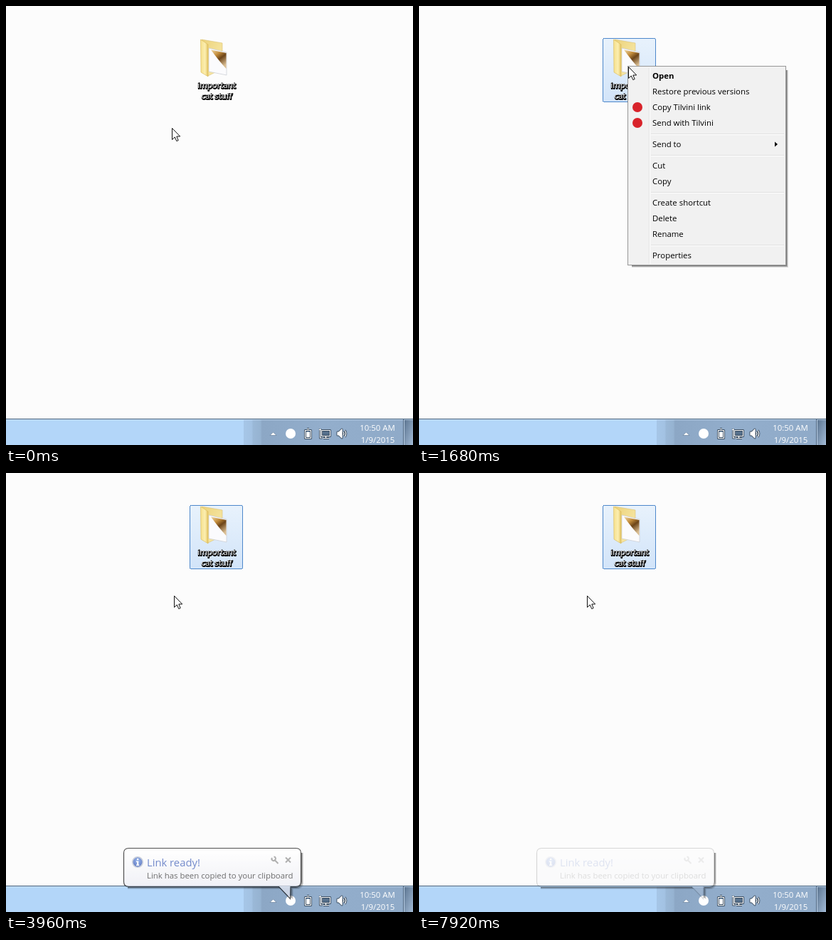
Recreate the animation shown at these times as an HTML page. Size 572 px wide and 616 px high, loop 8000 ms.

```html
<!DOCTYPE html>
<html lang="en">
<head>
<meta charset="utf-8">
<title>Copy link from the desktop</title>
<style>
  html, body { margin: 0; width: 100%; height: 100%; overflow: hidden; background: #fcfcfc; }
  svg { display: block; width: 100%; height: 100%; }
  text { font: 11.4px "Open Sans", "Noto Sans", sans-serif; }
  .bold { font-weight: 700; }
  .label { text-anchor: middle; fill: #fff; font-weight: 500; }
  .label.shade { fill: #000; stroke: #000; stroke-width: 1.9; stroke-linejoin: round; }
  .clock { text-anchor: middle; fill: #fff; font-weight: 500; }
  .title { font-size: 14.8px; fill: #3557b5; }
  .crisp { shape-rendering: crispEdges; }
  .line { fill: none; stroke-linejoin: round; }
</style>
</head>
<body>
<svg viewBox="0 0 572 616">
  <defs>
    <linearGradient id="tray">
      <stop offset="0" stop-color="#a6c6e7"/><stop offset=".05" stop-color="#a3c2e3"/>
      <stop offset=".06" stop-color="#9ab8d7"/><stop offset=".105" stop-color="#96b3d1"/>
      <stop offset=".115" stop-color="#8ca7c5"/><stop offset=".5" stop-color="#93aecc"/>
      <stop offset="1" stop-color="#8faac8"/>
    </linearGradient>
    <linearGradient id="corner" x2="1" y2="1">
      <stop offset="0" stop-color="#58718d"/><stop offset="1" stop-color="#a3bbd6"/>
    </linearGradient>
    <linearGradient id="flap">
      <stop offset="0" stop-color="#f6e08c"/><stop offset=".6" stop-color="#fbeeb0"/>
      <stop offset="1" stop-color="#e3c25f"/>
    </linearGradient>
    <linearGradient id="back" x2="1" y2="1">
      <stop offset="0" stop-color="#ecd27a"/><stop offset="1" stop-color="#faeeb4"/>
    </linearGradient>
    <linearGradient id="photo" x2=".6" y2="1">
      <stop offset="0" stop-color="#f0d9a8"/><stop offset=".35" stop-color="#c48d3c"/>
      <stop offset=".6" stop-color="#6d4519"/><stop offset="1" stop-color="#d9bd92"/>
    </linearGradient>
    <linearGradient id="light" x2="0" y2="1">
      <stop offset="0" stop-color="#e8f2fc"/><stop offset="1" stop-color="#d2e4f9"/>
    </linearGradient>
    <linearGradient id="strong" x2="0" y2="1">
      <stop offset="0" stop-color="#dae8f9"/><stop offset="1" stop-color="#bcd5f5"/>
    </linearGradient>
    <linearGradient id="row" x2="0" y2="1">
      <stop offset=".4" stop-color="#f6f9fc"/><stop offset=".45" stop-color="#e8eff7"/>
      <stop offset="1" stop-color="#e6eef8"/>
    </linearGradient>
    <linearGradient id="bubble" x2="0" y2="1">
      <stop offset=".1" stop-color="#fff"/><stop offset="1" stop-color="#e4e5f0"/>
    </linearGradient>
    <radialGradient id="info" cy=".35">
      <stop offset="0" stop-color="#6f9ae8"/><stop offset="1" stop-color="#2a50b4"/>
    </radialGradient>
    <g id="trayIcons" class="line">
      <path d="M420.500 595.500H428.500V606.500H420.500ZM423 593.500H426"/>
      <path d="M443.500 595.500H455.500V603.500H443.500ZM446 606.500H454M449.500 604V606M441.500 593V606H445M440 594.500H443"/>
      <path d="M466 598H468L472 594V606L468 602H466Z"/>
      <path d="M474 597.500Q476 600 474 602.500M476 595.500Q479.500 600 476 604.500"/>
    </g>
  </defs>

  <rect width="572" height="616" fill="#fcfcfc"/>

  <g id="selection">
    <rect id="selectFill" x="258.5" y="45.5" width="74" height="89" rx="2"/>
    <rect id="focus" class="crisp" x="258.5" y="45.5" width="74" height="89" rx="2" fill="none"
      stroke="#1d5fae" stroke-dasharray="1 1"/>
  </g>

  <g>
    <path d="M275 47L304 52V88L284 98Z" fill="url(#back)" stroke="#dcc272" stroke-width=".6"/>
    <path d="M285 59L310 65V97L285 92Z" fill="#fbfbfd" stroke="#c9ccd2" stroke-width=".7"/>
    <path d="M288 61.500L309.500 66V88Q300 78 288 61.500Z" fill="url(#photo)"/>
    <path d="M273.500 47L284 54V99L274 93Z" fill="url(#flap)" stroke="#d9b958" stroke-width=".6"/>
  </g>
  <g id="labels"></g>

  <g id="taskbar">
    <rect y="579" width="572" height="37" fill="#b3d6f9"/>
    <rect x="334" y="579" width="225" height="37" fill="url(#tray)"/>
    <rect x="559" y="579" width="13" height="37" fill="url(#corner)"/>
    <path class="crisp" d="M0 580.5H572" stroke="#d3e7fb" stroke-opacity=".7"/>
    <path class="crisp" d="M0 579.5H572" stroke="#46617c"/>
    <path class="crisp" d="M558.500 580V616" stroke="#4f6680"/>
    <path class="crisp" d="M559.500 581V616" stroke="#b9cee4"/>
    <path d="M371 602.500L375.500 598L380 602.500Z" fill="#fff" stroke="#5c7590" stroke-width=".6"/>
    <circle cx="400" cy="600" r="7" fill="#fff"/>
    <use href="#trayIcons" stroke="#35485c" stroke-width="3"/>
    <path d="M445 597H454V602H445Z" fill="#56708c"/>
    <use href="#trayIcons" stroke="#fff" stroke-width="1.200"/>
    <path d="M422 598H427V605H422ZM466 598H468L472 594V606L468 602H466Z" fill="#fff"/>
    <text class="clock" x="522" y="596">10:50 AM</text>
    <text class="clock" x="522.5" y="613">1/9/2015</text>
  </g>

  <g id="menuShadow" class="line crisp" stroke="#000"></g>
  <g id="menu">
    <rect x="293.5" y="84.5" width="222" height="279" fill="#f1f1f1" stroke="#979797"/>
    <path class="crisp" d="M323.500 87V362" stroke="#e2e3e3"/>
    <path class="crisp" d="M324.500 87V362" stroke="#fff"/>
    <rect id="hover" x="296.500" width="216" height="21" rx="2" fill="url(#row)" stroke="#aecff7"/>
    <g id="items"></g>
    <path d="M500 190.500L504 194L500 197.500Z"/>
  </g>
  <g id="chosen">
    <rect x="296.500" y="131.500" width="216" height="21" rx="2" fill="url(#row)" stroke="#b4d3f5"/>
  </g>

  <g id="balloonShadow" class="line" stroke="#000"></g>
  <g id="balloon">
    <path d="M172.500 526.500H407.500Q414.500 526.500 414.500 533.500V573.500Q414.500 580.500 407.500 580.500H400L399.500 597.500L383.500 580.500H172.500Q165.500 580.500 165.500 573.500V533.500Q165.500 526.500 172.500 526.500Z"
      fill="url(#bubble)" stroke="#000" stroke-width="1.200"/>
    <circle cx="185" cy="546" r="7.200" fill="url(#info)" stroke="#b4bccd" stroke-width="1.600"/>
    <path d="M184 541H186.300V543H184ZM183 544.500H186.300V549.500H187.300V551H183V549.500H184V546H183Z" fill="#fff"/>
    <text class="title" x="198" y="552">Link ready!</text>
    <text x="198" y="569" fill="#2c2c2c">Link has been copied to your clipboard</text>
    <g class="line" stroke="#8c8c8c" stroke-width="2">
      <path d="M377 542.500L382.500 548M374 540A2.500 2.500 0 0 0 378 543A2.500 2.500 0 0 0 376.500 538.500"/>
      <path d="M393 539.500L400 546.500M400 539.500L393 546.500"/>
    </g>
  </g>

  <g id="pointer">
    <path d="M.5 .5V16.500L4.300 13L6.800 18.600L9.200 17.500L6.800 12H11.700Z" fill="#fff" stroke="#111"/>
    <g id="busy">
      <circle cx="15" cy="0" r="6.200" fill="#e3f3f8" stroke="#3b93ad" stroke-width="2.800"/>
      <circle id="spin" cx="15" cy="0" r="6.200" fill="none" stroke="#9fe0e2" stroke-width="2" stroke-dasharray="10 29"/>
    </g>
  </g>
</svg>
<script>
const LOOP = 8000;
const $ = id => document.getElementById(id);
const set = (id, attrs) => { for (const k in attrs) $(id).setAttribute(k, attrs[k]); };
const show = (id, opacity) => set(id, { opacity: +opacity });

// Menu rows: [text centre y, caption]
const rows = [
  [98, 'Open'], [120, 'Restore previous versions'], [142, 'Copy Tilvini link'],
  [164, 'Send with Tilvini'], [194, 'Send to'], [224, 'Cut'], [246, 'Copy'],
  [276, 'Create shortcut'], [298, 'Delete'], [320, 'Rename'], [350, 'Properties']
];
const rowMarkup = ([y, caption]) =>
  (caption.includes('Tilvini') ? `<circle cx="307" cy="${y}" r="7" fill="#d8232a"/>` : '') +
  `<text x="328" y="${y + 4}" class="${caption === 'Open' ? 'bold' : ''}">${caption}</text>`;
const divider = y =>
  `<path class="crisp" d="M326 ${y - .5}H513" stroke="#e0e0e0"/><path class="crisp" d="M326 ${y + .5}H513" stroke="#fff"/>`;

$('items').innerHTML = rows.map(rowMarkup).join('') + [180, 210, 262, 336].map(divider).join('');
$('chosen').innerHTML += rowMarkup(rows[2]);
$('labels').innerHTML = [['important', 115], ['cat stuff', 130]].map(([word, y]) =>
  `<text class="label shade" x="296.500" y="${y + .7}">${word}</text><text class="label" x="296" y="${y}">${word}</text>`).join('');

const shadowLayers = [.5, .3, .12];
$('menuShadow').innerHTML = shadowLayers.map((o, i) =>
  `<path d="M${516.5 + i} 90V${364.5 + i}H299" stroke-opacity="${o}"/>`).join('');
$('balloonShadow').innerHTML = shadowLayers.map((o, i) =>
  `<path d="M${415.5 + i} 533V${574 + i}Q${415.5 + i} ${581.5 + i} 408 ${581.5 + i}H${401 + i}V${596 + i}M${384 + i} ${581.5 + i}H171" stroke-opacity="${o}"/>`).join('');

const clamp = v => Math.min(1, Math.max(0, v));
const ease = p => p * p * (3 - 2 * p);
// Progress that rises in n equal jumps, the first one at `start`
const steps = (t, start, gap, n) => clamp((Math.floor((t - start) / gap) + 1) / n);

// Pointer moves: [start, gap, steps, x, y]
const moves = [
  [500, 55, 9, 293, 84], [1680, 60, 1, 294, 85],
  [1740, 60, 5, 317, 134], [2740, 60, 9, 236, 172]
];
function pointerAt(t) {
  let x = 233, y = 171;
  for (const [start, gap, n, toX, toY] of moves) {
    const p = ease(steps(t, start, gap, n));
    x += (toX - x) * p;
    y += (toY - y) * p;
  }
  return [Math.round(x), Math.round(y)];
}

const fadeTicks = [4590, 4840, 5100, 5350, 5680, 6010, 6300, 6600, 6900, 7140, 7380, 7620, 7920];
function balloonOpacity(t) {
  if (t < 4590) return 1 - (1 - clamp((t - 3300) / 1290)) ** 1.6;
  const tick = fadeTicks.filter(v => v <= t).pop();
  return 1 - .86 * (tick - 4590) / 3330;
}

function draw(t) {
  const [x, y] = pointerAt(t);
  const over = x >= 258 && x <= 332 && y >= 45 && y <= 134;
  const selected = t >= 1180;
  const strong = selected && over && (t < 1340 || t >= 2440);
  const menuOpen = t >= 1180 && t < 2440;

  show('selection', selected || over);
  show('focus', selected);
  set('selectFill', {
    fill: `url(#${strong ? 'strong' : 'light'})`,
    stroke: selected ? '#7db0e8' : '#b8d6fb'
  });

  show('menuShadow', menuOpen);
  show('menu', menuOpen ? steps(t, 1180, 40, 5) : 0);
  const row = Math.floor((y - 87) / 22);
  show('hover', row >= 0);
  set('hover', { y: 87.5 + 22 * Math.max(0, row) });
  show('chosen', t >= 2440 ? 1 - steps(t, 2500, 60, 4) : 0);

  show('balloonShadow', t >= 3320);
  show('balloon', balloonOpacity(t));

  set('pointer', { transform: `translate(${x} ${y})` });
  show('busy', t >= 2440 && t < 2800);
  set('spin', { transform: `rotate(${t * .36} 15 0)` });
}

function frame() {
  draw(performance.now() % LOOP);
  requestAnimationFrame(frame);
}
frame();
</script>
</body>
</html>
```
